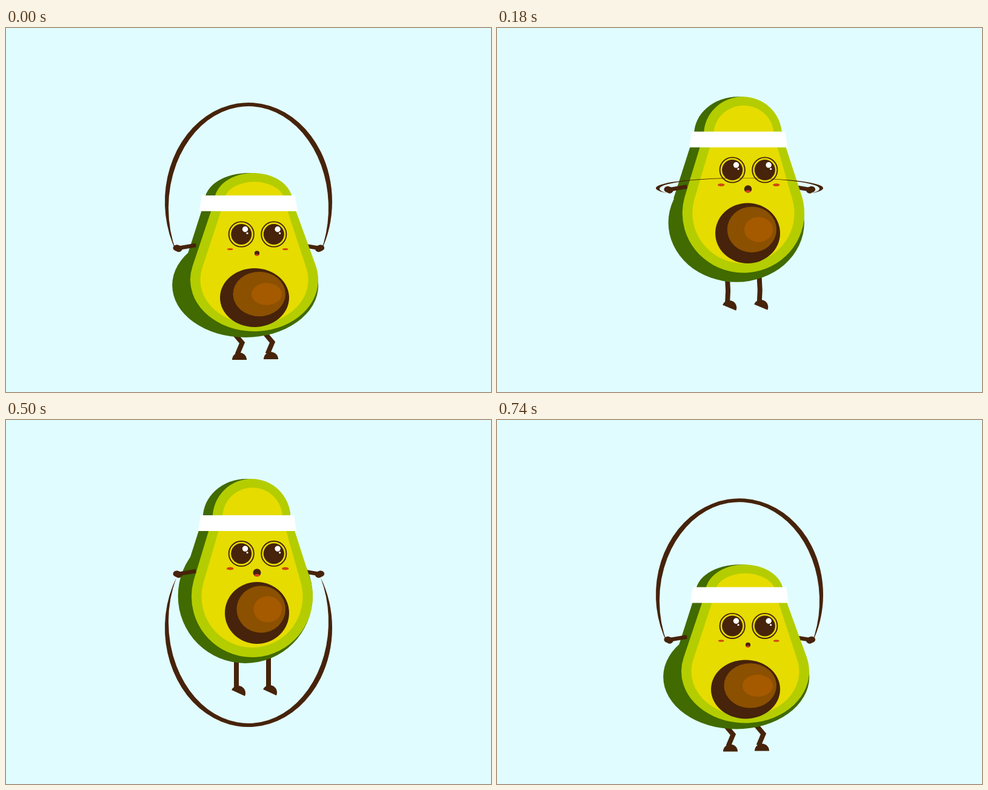
Animation of 800x600 px, one loop 0.76 s. Source, as an HTML page with a canvas:

```html
<!DOCTYPE html>
<html lang="en">
<head>
<meta charset="utf-8">
<title>Skipping avocado</title>
<style>
html, body { margin: 0; width: 100%; height: 100%; overflow: hidden; background: #e1fcff; }
canvas { display: block; width: 800px; height: 600px; }
</style>
</head>
<body>
<canvas id="stage" width="800" height="600"></canvas>
<script>
const ctx = document.getElementById('stage').getContext('2d');
const PI = Math.PI;
const LOOP = 760, STEP = 20;
const RISE = 260, DROP = 500, FLAT = 640;
const SKY = '#e1fcff', RIND = '#416a00', FLESH = '#b4cd00', PULP = '#e6dc00',
  DARK = '#46230a', SEED = '#8b5000', SHINE = '#a55a00', BLUSH = '#d2460f', TONGUE = '#dc3c23';

const lerp = (a, b, p) => a + (b - a) * p;
const part = (t, from, to) => (t - from) / (to - from);
const easeOut = (u, n) => 1 - Math.pow(1 - u, n);

// 0 = squashed on the ground, 1 = stretched in the air
function lift(t) {
  if (t < RISE) return Math.sin(part(t, 0, RISE) * PI / 2);
  if (t <= DROP) return 1;
  return 1 - easeOut(part(t, DROP, LOOP), 2.1);
}

// 1 = rope overhead, 0 = edge on, -1 = under the feet
function swing(t) {
  if (t < RISE) return Math.pow(1 - lift(t), 1.05);
  if (t < DROP) return -easeOut(part(t, RISE, DROP), 2.9);
  if (t < FLAT) return easeOut(part(t, DROP, FLAT), 2) - 1;
  return easeOut(part(t, FLAT, LOOP), 2);
}

function fill(color, trace) {
  ctx.fillStyle = color;
  ctx.beginPath();
  trace();
  ctx.fill();
}

function oval(color, x, y, rx, ry = rx) {
  fill(color, () => ctx.ellipse(x, y, rx, ry, 0, 0, 2 * PI));
}

function line(width, ...points) {
  ctx.strokeStyle = DARK;
  ctx.lineWidth = width;
  ctx.beginPath();
  for (const [x, y] of points) ctx.lineTo(x, y);
  ctx.stroke();
}

const dome = o => ctx.ellipse(o.x, o.y, o.rx, o.ry, 0, PI, 2 * PI);
const inset = (o, dx, dy) => ({ ...o, rx: o.rx - dx, ry: o.ry - dy });

// Two ovals joined by straight tangents
function pear(color, head, belly) {
  const a = 0.27;
  fill(color, () => {
    dome(head);
    ctx.ellipse(belly.x, belly.y, belly.rx, belly.ry, 0, -a, PI + a);
    ctx.closePath();
  });
}

// A crescent whose two arcs meet at the hands
function rope(s, handY) {
  const k = Math.abs(s), dir = Math.sign(s);
  if (k < 0.004) return;
  const arc = (rx, height, side) => {
    const c = Math.sqrt(1 - (119 / rx) ** 2);
    const ry = height / (1 + c), a = Math.asin(c) * dir;
    const left = PI - a, right = a;
    const [from, to] = side > 0 ? [left, right] : [right, left];
    ctx.ellipse(400, handY + 6 - dir * c * ry, rx, ry, 0, from, to, side * dir < 0);
  };
  fill(DARK, () => {
    arc(138, 246 * k, 1);
    arc(132, 240 * k, -1);
  });
}

function leg(side, p) {
  const bend = 1 - p;
  const x = 406.5 + side * (26.5 - 1.5 * bend);
  const footX = 411 + side * 26 - 2 * p;
  const y = 546.5 - side / 2 - 97 * p;
  line(8, [x - 8 * bend, y - 47 - 18 * p], [x + 8 * bend, y - 28], [x, y - 9]);
  ctx.save();
  ctx.translate(footX, y);
  ctx.rotate(p * 0.44);
  fill(DARK, () => dome({ x: 0, y: 0, rx: 12, ry: 12 }));
  ctx.restore();
}

function arm(side, y) {
  const x = 400.3 + side * 117;
  line(6.5, [x - side * 30, y - 5], [x, y]);
  oval(DARK, x + side * 1.5, y - 0.6, 6.3, 5.2);
  oval(DARK, x - side * 1.5, y + 0.8, 6, 5.4);
}

function eye(x, y) {
  ctx.strokeStyle = DARK;
  ctx.lineWidth = 1.9;
  ctx.beginPath();
  ctx.arc(x, y, 20.6, 0, 2 * PI);
  ctx.stroke();
  oval(DARK, x, y, 17);
  oval('#fff', x + 6.3, y - 8.2, 4.7);
  oval('#fff', x + 9.8, y - 1.7, 1.6);
}

function face(p) {
  const y = 340 - 119.7 * p;
  const open = lerp(4.1, 6.5, p);
  for (const side of [-1, 1]) {
    eye(415 + side * 26.8, y);
    oval(BLUSH, 415.2 + side * 45.5, y + 24.6, 4.8 + p, 1.7 + 0.7 * p);
  }
  oval(DARK, 414, y + 31.4, open);
  ctx.save();
  ctx.clip();
  oval(TONGUE, 414, y + 31.4 + open * 0.95, open * 0.85, open * 0.65);
  ctx.restore();
}

function body(t, p) {
  // On the way up the heavy parts trail behind and stretch late
  const u = Math.min(t / RISE, 1);
  const trail = u * (1 - u);
  const stretch = u < 1 ? u * u : p;
  const rindP = p - 0.23 * trail;
  const seedP = p - 0.58 * trail * (1 - u);

  const head = { x: 408 - 3 * p, y: 285 - 124 * p, rx: 64.2, ry: 46 + 18 * p };
  const belly = { x: 409.5 - 3.5 * p, y: 415 - 124 * p, rx: 105.5 - 5.5 * p, ry: 85 + 15 * p };
  const rind = { ...head, x: head.x - 8, rx: head.rx + 8 };
  const rindH = lerp(86, 111, stretch);
  const edge = rind.x - rind.rx;

  oval(RIND, 394.7, lerp(510, 401, rindP) - rindH, lerp(120.5, 111, p), rindH);
  fill(RIND, () => {
    dome(rind);
    ctx.lineTo(495, head.y + 106);
    ctx.lineTo(edge - 34, head.y + 106);
  });

  pear(FLESH, head, belly);
  const rim = 12 + 4 * p;
  pear(PULP, inset({ ...head, x: head.x + 1.5 }, 14.7, 14.5), inset(belly, 16.5, rim));

  const w = lerp(57, 53, p), h = lerp(48.5, 51, stretch);
  const seedY = lerp(493, 369, seedP) - h;
  [DARK, SEED, SHINE].forEach((color, i) => {
    const size = [1, 0.76, 0.44][i];
    oval(color, 467 - 6 * i - w * size, seedY - (i && 6), w * size, h * size * (i > 1 ? lerp(0.85, 0.96, p) : 1));
  });

  const bandY = 276 - 119 * p, mid = 400 - 2 * p;
  fill('#fff', () => {
    ctx.moveTo(mid - 77, bandY);
    ctx.lineTo(mid + 77, bandY);
    ctx.lineTo(mid + 81, bandY + 26);
    ctx.lineTo(mid - 81, bandY + 26);
  });
}

function draw(t) {
  const p = lift(t), s = swing(t);
  const handY = 363 - 109 * p;

  ctx.fillStyle = SKY;
  ctx.fillRect(0, 0, 800, 600);

  if (t > DROP) rope(s, handY);
  arm(1, handY);
  leg(-1, p);
  leg(1, p);
  body(t, p);
  face(p);
  if (t <= DROP) rope(s, handY);
  arm(-1, handY);
}

const start = performance.now();
function tick() {
  const t = (performance.now() - start) % LOOP;
  draw(Math.floor(t / STEP) * STEP);
  requestAnimationFrame(tick);
}
tick();
</script>
</body>
</html>
```
